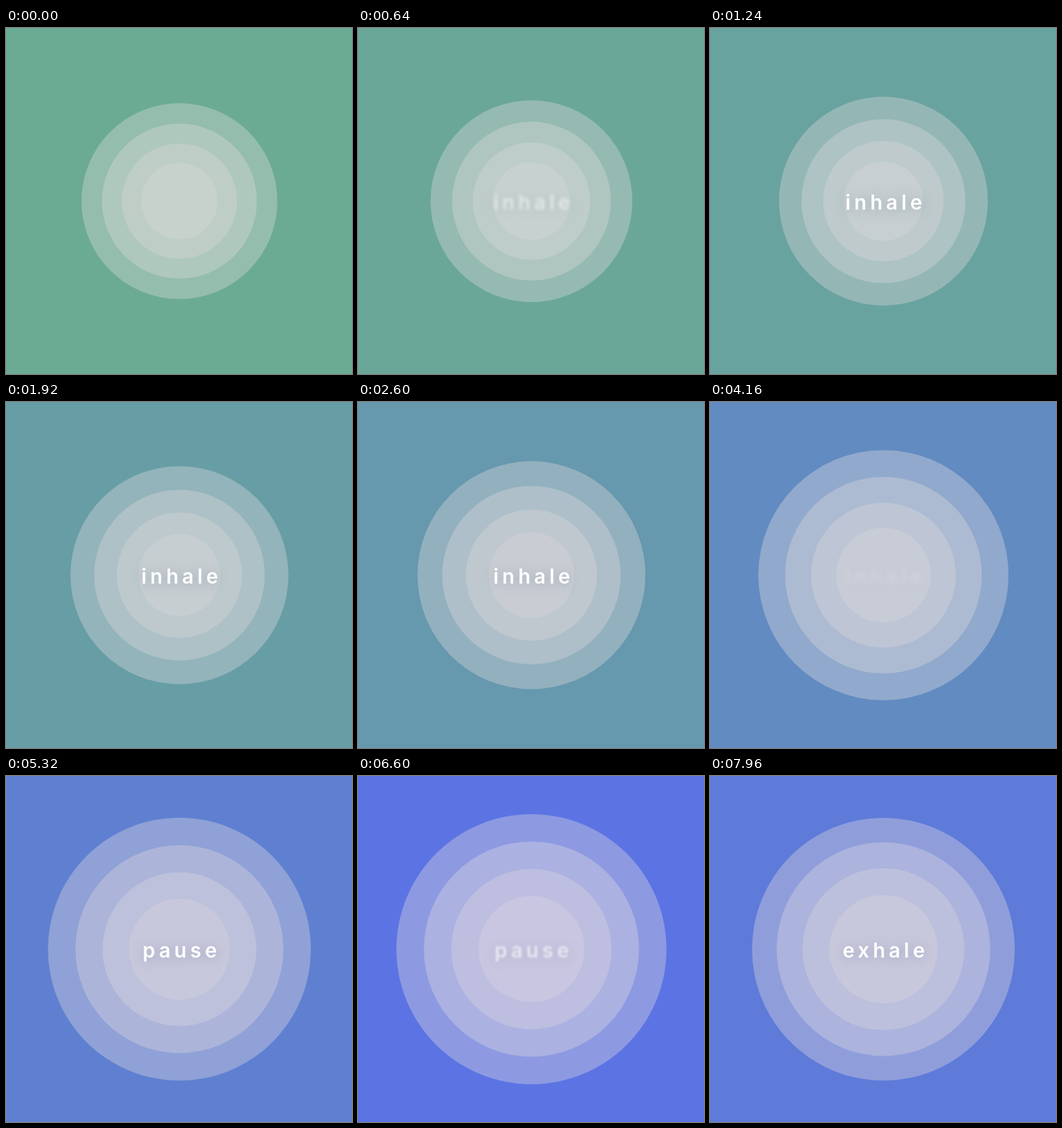
An HTML page that plays this animation: 480 px wide and 480 px high, repeating every 8000 ms.

```html
<!DOCTYPE html>
<html lang="en">
<head>
<meta charset="utf-8">
<title>Breathing guide</title>
<style>
  html, body { margin: 0; width: 100%; height: 100%; overflow: hidden; }
  svg { display: block; width: 100vw; height: 100vh; }
  circle { fill-opacity: .4; }
  text {
    font: 600 28px Inter, Lato, sans-serif;
    letter-spacing: 5px;
    text-anchor: middle;
    fill: #fff;
  }
</style>
</head>
<body>
<svg viewBox="0 0 480 480">
  <rect id="bg" width="480" height="480"/>
  <g id="rings"></g>
  <g id="words"></g>
</svg>
<script>
const LOOP = 8000;
const NS = 'http://www.w3.org/2000/svg';

const RINGS = 4, RADIUS = 187.6, SWELL = 0.149;
const PEAK = 7000, LAG = 330;        // each inner ring peaks a little later
const INHALE = 8500, EXHALE = 4830;  // half periods of the two strokes

const GREEN = [107, 171, 147], INDIGO = [91.5, 115, 229];
const VEIL_WARM = [213, 214, 213], VEIL_COOL = [215, 210, 222];
const TINT_PEAK = 6750;

const FADE = 850;
const WORDS = [
  { word: 'inhale', from: 200, to: 4380 },
  { word: 'pause', from: 4350, to: 7080 },
  { word: 'exhale', from: 7020, to: 11000 }
];

function add(parent, tag, attrs) {
  const el = document.createElementNS(NS, tag);
  for (const k in attrs) el.setAttribute(k, attrs[k]);
  return document.getElementById(parent).appendChild(el);
}

const bg = document.getElementById('bg');
const rings = Array.from({ length: RINGS }, () => add('rings', 'circle', { cx: 240.6, cy: 240.2 }));
for (const w of WORDS) {
  w.el = add('words', 'text', { x: 243.5, y: 251.5 });
  w.el.textContent = w.word;
}

const clamp = v => Math.min(1, Math.max(0, v));
const smooth = v => v * v * (3 - 2 * v);
const ramp = (t, a, b) => smooth(clamp((t - a) / (b - a)));
const mix = (a, b, f) => `rgb(${a.map((v, i) => Math.round(v + (b[i] - v) * f))})`;

function radius(t, i) {
  const d = t - PEAK - i * LAG;
  const dip = 1 - Math.cos(Math.PI * d / (d < 0 ? INHALE : EXHALE));
  return RADIUS * (1 - i * 0.2) * (1 - SWELL * dip);
}

function tint(t) {
  return t < TINT_PEAK ? (t / TINT_PEAK) ** 1.15 : 1 - (t - TINT_PEAK) / 8000;
}

function drawWord({ el, from, to }, t) {
  const show = ramp(t, from, from + FADE) * (1 - ramp(t, to - FADE, to));
  const blur = 4 * (1 - show);
  el.style.display = show > 0 ? '' : 'none';
  el.style.opacity = show;
  el.style.filter = (blur > 0.02 ? `blur(${blur.toFixed(2)}px) ` : '')
    + 'drop-shadow(0 2px 8px rgba(110, 130, 155, .5))';
}

function draw(t) {
  const f = tint(t);
  const veil = mix(VEIL_WARM, VEIL_COOL, f);
  bg.setAttribute('fill', mix(GREEN, INDIGO, f));
  rings.forEach((ring, i) => {
    ring.setAttribute('r', radius(t, i).toFixed(2));
    ring.setAttribute('fill', veil);
  });
  WORDS.forEach(w => drawWord(w, t));
}

const start = performance.now();
function tick() {
  draw((performance.now() - start) % LOOP);
  requestAnimationFrame(tick);
}
tick();
</script>
</body>
</html>
```
